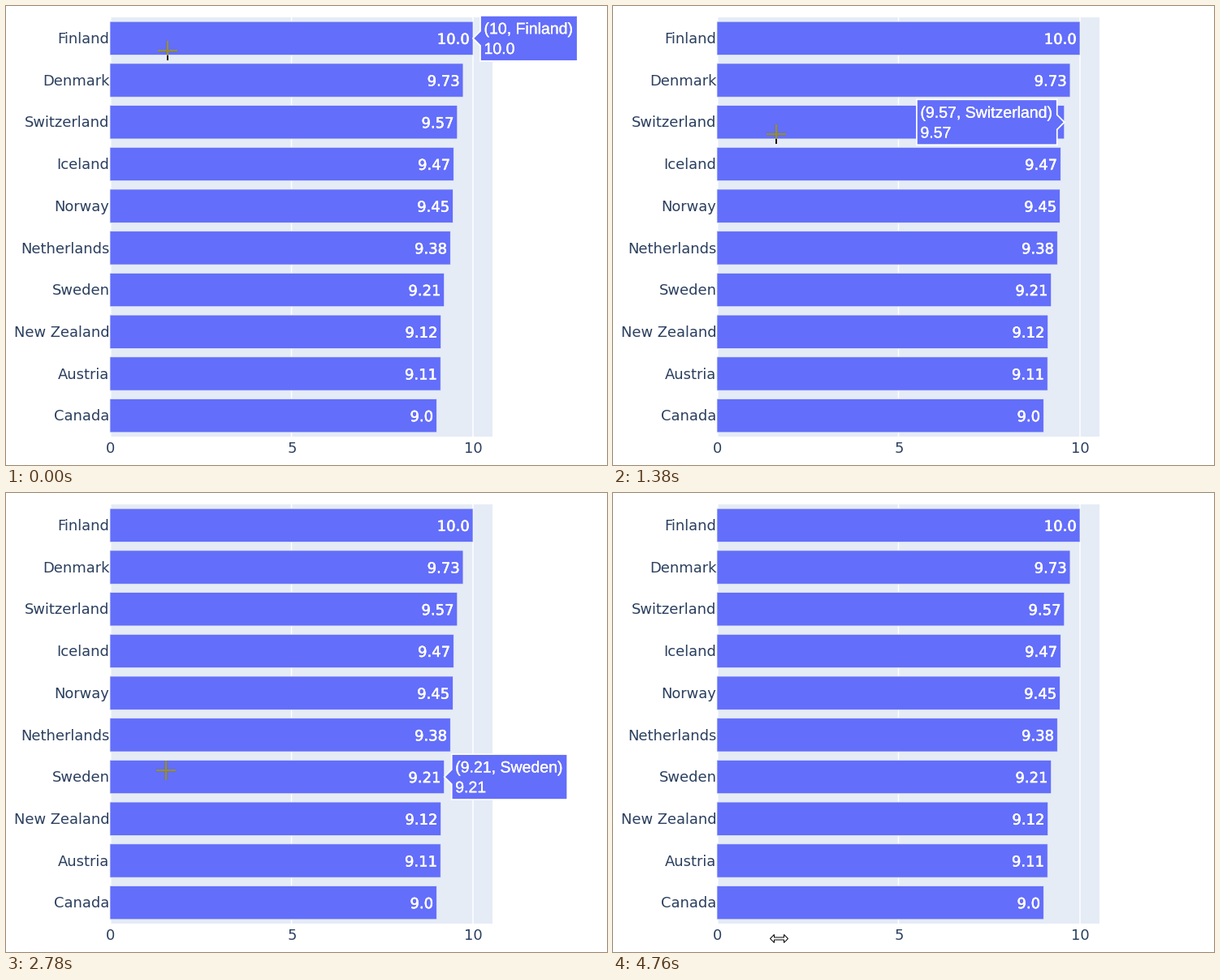
A matplotlib script that plays this animation: 740 by 566 pixels, repeating every 4.83 s.

```python
import matplotlib.pyplot as plt
import numpy as np
from matplotlib.animation import FuncAnimation
from matplotlib.patches import Polygon, Rectangle
from matplotlib.path import Path
from matplotlib.patheffects import withStroke
from matplotlib.textpath import TextPath

W, H, DPI = 740, 566, 100
CLIP = 719                      # chart canvas ends before the page does
LOOP, STEP = 4830, 30
PX = 72 / DPI

BAR, PLOT, INK = "#636efa", "#e5ecf6", "#2a3f5f"
BAR_INV, PLOT_INV = "#9c9105", "#1a1309"

SCORES = {"Finland": 10.0, "Denmark": 9.73, "Switzerland": 9.57,
          "Iceland": 9.47, "Norway": 9.45, "Netherlands": 9.38,
          "Sweden": 9.21, "New Zealand": 9.12, "Austria": 9.11,
          "Canada": 9.0}
ROWS = list(SCORES.items())
LEFT, TOP, RIGHT, BOTTOM = 128, 14, 599, 531
ROW_H = (BOTTOM - TOP) / len(ROWS)
UNIT = 44.7

SANS, ARIAL = "DejaVu Sans", "Liberation Sans"
LABEL_PX, VALUE_PX, TIP_PX = 17.85, 18, 19.5
ARROW, PAD, TIP_HALF = 9, 4.5, 28

# the pointer glides to each stop in four quick hops, then rests
GLIDE, HOP, HOPS = (199, 55), 70, 4
STOPS = [(70, 197, 64), (510, 191, 88), (970, 203, 146), (1380, 194, 194),
         (1820, 195, 234), (2200, 197, 290), (2640, 197, 359),
         (3000, 204, 402), (3370, 207, 427), (3660, 210, 453),
         (4080, 208, 509), (4550, 204, 549)]


def row_mid(i):
    return TOP + (i + 0.5) * ROW_H


def bar_end(v):
    return LEFT + UNIT * v


def advance(s, font, px):
    """Width of a text including its side bearings."""
    edge = [TextPath((0, 0), t, size=px, prop={"family": font})
            .get_extents().x1 for t in (s + "l", "l")]
    return edge[0] - edge[1]


def put(x, y, s, color, font=SANS, px=LABEL_PX, align=0.0, bold=0, z=4):
    """Text on baseline y; align 0 starts at x, 1 ends there."""
    if align:
        x -= align * advance(s, font, px)
    text = ax.text(x, y, s, color=color, family=font, size=px * PX,
                   va="baseline", ha="left", zorder=z, clip_on=True)
    if bold:
        text.set_path_effects([withStroke(linewidth=bold * PX,
                                          foreground=color)])
    return text


def pointer(t):
    pos = np.array(GLIDE, float)
    for start, x, y in STOPS:
        done = np.clip((t - start) // HOP + 1, 0, HOPS) / HOPS
        pos += (np.array((x, y)) - pos) * done
    return np.rint(pos)


fig = plt.figure(figsize=(W / DPI, H / DPI), dpi=DPI, facecolor="white")
ax = fig.add_axes([0, 0, CLIP / W, 1])
ax.set_xlim(0, CLIP)
ax.set_ylim(H, 0)
ax.axis("off")

# plot area and grid
ax.add_patch(Rectangle((LEFT, TOP), RIGHT - LEFT, BOTTOM - TOP,
                       color=PLOT, lw=0, zorder=0))
for tick in (0, 5, 10):
    x = bar_end(tick)
    ax.plot([x, x], [TOP, BOTTOM], color="white", zorder=1, snap=False,
            lw=(1.5 if tick else 3) * PX, solid_capstyle="butt")
    put(x + 0.3, 551, str(tick), INK, align=0.5)

# bars with their labels
bars = []
for i, (name, value) in enumerate(ROWS):
    mid, end = row_mid(i), bar_end(value)
    bar = Rectangle((LEFT, mid - 0.4 * ROW_H), end - LEFT, 0.8 * ROW_H,
                    fc=BAR, ec=PLOT, lw=0.75 * PX, snap=False, zorder=2)
    ax.add_patch(bar)
    bars.append(Path(bar.get_corners()[[0, 1, 2, 3, 0]], closed=True))
    put(127.3, mid + 6.2, name, INK, align=1)
    put(end - 4.2, mid + 7, str(value), "white", px=VALUE_PX, align=1,
        bold=0.5)

# hover label
tip = Polygon([(0, 0), (1, 0), (1, 1)], closed=True, fc=BAR, ec="white",
              lw=1.75 * PX, joinstyle="miter", snap=False, zorder=5)
ax.add_patch(tip)
tip_lines = [put(0, 0, "", "white", ARIAL, TIP_PX, bold=0.25, z=6)
             for _ in range(2)]
TIP_TEXT = [(f"({v:g}, {name})", str(v)) for name, v in ROWS]
TIP_W = [advance(s[0], ARIAL, TIP_PX) + 2 * PAD + 1.3 for s in TIP_TEXT]

# crosshair, inverted against what lies beneath
bar_area = Path.make_compound_path(*bars)
cross = []
for color, z in ((PLOT_INV, 7), (BAR_INV, 8)):
    for _ in range(2):
        line, = ax.plot([], [], color=color, lw=2 * PX, zorder=z,
                        solid_capstyle="butt", antialiased=False)
        if color == BAR_INV:
            line.set_clip_path(bar_area, ax.transData)
        cross.append(line)

# resize pointer
HALF = [(-11, 0), (-6, -5), (-6, -1.5), (6, -1.5), (6, -5)]
ARROWS = np.array(HALF + [(-x, -y) for x, y in HALF])
resize = Polygon(ARROWS, closed=True, fc="white", ec="black", lw=1 * PX,
                 joinstyle="miter", zorder=9)
ax.add_patch(resize)


def show_tip(i):
    name, value = ROWS[i]
    x, mid, w = bar_end(value), row_mid(i), TIP_W[i]
    side = -1 if len(name) > 10 else 1      # long names flip to the left
    near, far = x + side * ARROW, x + side * (ARROW + w)
    tip.set_xy([(x, mid), (near, mid + ARROW), (near, mid + TIP_HALF),
                (far, mid + TIP_HALF), (far, mid - TIP_HALF),
                (near, mid - TIP_HALF), (near, mid - ARROW)])
    for line, s, dy in zip(tip_lines, TIP_TEXT[i], (-5.6, 19.2)):
        line.set_text(s)
        line.set_position((min(near, far) + PAD, mid + dy))


def update(n):
    x, y = pointer(n * STEP + 20)
    inside = y < BOTTOM
    for artist in [tip, *tip_lines, *cross]:
        artist.set_visible(inside)
    resize.set_visible(not inside)
    if inside:
        show_tip(min(int((y - TOP) / ROW_H), len(ROWS) - 1))
        for k in (0, 2):
            cross[k].set_data([x - 12, x + 12], [y, y])
            cross[k + 1].set_data([x, x], [y - 12, y + 12])
    else:
        resize.set_xy(ARROWS + (x + 0.5, y + 0.5))
    return [tip, *tip_lines, *cross, resize]


anim = FuncAnimation(fig, update, frames=LOOP // STEP, interval=STEP,
                     repeat=True, repeat_delay=0, blit=False)
plt.show()
```
